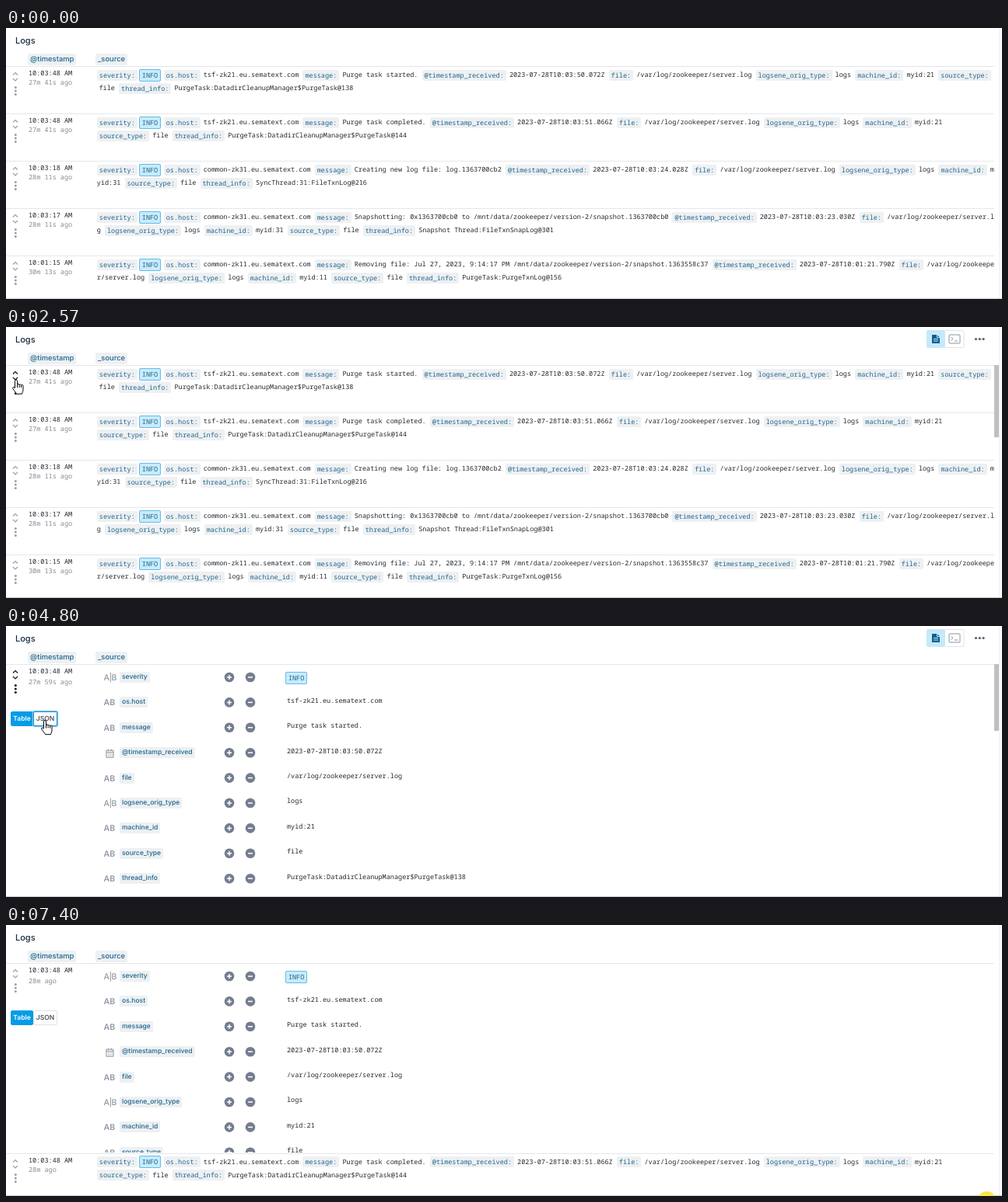
Recreate the animation shown at these times as an HTML page. Size 1280 by 349 pixels, loop 7460 ms.

```html
<!DOCTYPE html>
<html lang="en">
<head>
<meta charset="utf-8">
<title>Logs</title>
<style>
html, body { margin: 0; width: 100%; height: 100%; overflow: hidden; background: #fff; }
#stage { position: relative; width: 1280px; height: 349px; overflow: hidden; text-rendering: geometricPrecision; }
#stage div, #stage svg, p { position: absolute; margin: 0; box-sizing: border-box; }
#stage > svg, .layer { left: 0; top: 0; width: 1280px; height: 349px; overflow: hidden; }
p { font: 8.53px/16px "Noto Sans Mono", monospace; color: #24292f; white-space: pre; }
.ui { font-family: Inter, sans-serif; font-weight: 500; }
.title { font-size: 11px; color: #16293d; }
.head { font-size: 9.4px; }
.ago { color: #858a91; }
.type { font-size: 10.6px; font-weight: 600; color: #929aa6; }
.split { font-weight: 500; letter-spacing: -.6px; }
.val { font-size: 8.07px; color: #cc3a14; }
b { font-weight: inherit; color: #1c668f; background: #eef0f2; border-radius: 2px; padding: 1.5px 3px; margin-right: 4.1px; }
.ui b { padding: 2px 3px; }
i { font-style: normal; color: #1c668f; background: #c8ebfb; border: 1px solid #64bbe6; border-radius: 2px; padding: 1.5px 3px; margin: 0 -1.6px 0 -2.1px; }
.line { left: 0; width: 1270px; height: 1px; background: #e4e7ea; }
.icons { fill: #9ba0a7; stroke: #9ba0a7; width: 24px; height: 50px; left: 0; }
.icons.on { fill: #111; stroke: #111; }
.btn { top: 110px; height: 19px; font: 500 8.5px/18px Inter, sans-serif; text-align: center; color: #333c48; background: #fff; border: 1px solid #dfe3e8; border-radius: 2px; }
.btn.on { color: #fff; font-weight: 600; background: #049ce6; border-color: #049ce6; }
.btn.focus { border-color: #1c87c5; box-shadow: 0 0 0 1.2px #7fcbf3; }
#thumb { left: 1270px; top: 49px; width: 6px; background: #bfbfbf; }
#tip { right: 1241px; top: 51px; height: 16px; padding: 0 3.5px; background: #595959; font: 500 8.5px/16px Inter, sans-serif; color: #fff; white-space: pre; }
</style>
</head>
<body>
<div id="stage"></div>
<script>
const LOOP = 7460, PITCH = 5.12;
const stage = document.getElementById('stage');
const $ = id => document.getElementById(id);

const text = (x, y, s, cls = '') => `<p class="${cls}" style="left:${x}px;top:${y - 8}px">${s}</p>`;
const chip = (x, y, s, cls = '') => text(x, y, `<b>${s}</b>`, 'ui ' + cls);
const svg = (body, attrs = '') => `<svg ${attrs}>${body}</svg>`;
const rule = y => `<div class="line" style="top:${y}px"></div>`;
const layer = (id, body) => `<div class="layer" id="${id}">${body}</div>`;

// {label} becomes a chip, INFO a badge
const fields = s => s.replace(/\{(.*?)\} ?/g, '<b>$1</b>').replace('INFO', '<i>INFO</i>');

const SERVER = '{file:} /var/log/zookeeper/server.log {logsene_orig_type:} logs {machine_id:}';
const start = (host, msg, time) =>
  `{severity:} INFO {os.host:} ${host}.eu.sematext.com {message:} ${msg} {@timestamp_received:} 2023-07-28T${time}Z `;
const logs = [
  ['10:03:48', '27m 41s', start('tsf-zk21', 'Purge task started.', '10:03:50.072') + SERVER + ' myid:21 {source_type:}',
    'file {thread_info:} PurgeTask:DatadirCleanupManager$PurgeTask@138'],
  ['10:03:48', '27m 41s', start('tsf-zk21', 'Purge task completed.', '10:03:51.066') + SERVER + ' myid:21',
    '{source_type:} file {thread_info:} PurgeTask:DatadirCleanupManager$PurgeTask@144'],
  ['10:03:18', '28m 11s', start('common-zk31', 'Creating new log file: log.1363700cb2', '10:03:24.028') + SERVER + ' m',
    'yid:31 {source_type:} file {thread_info:} SyncThread:31:FileTxnLog@216'],
  ['10:03:17', '28m 11s', start('common-zk31', 'Snapshotting: 0x1363700cb0 to /mnt/data/zookeeper/version-2/snapshot.1363700cb0', '10:03:23.030') + '{file:} /var/log/zookeeper/server.l',
    'g {logsene_orig_type:} logs {machine_id:} myid:31 {source_type:} file {thread_info:} Snapshot Thread:FileTxnSnapLog@301'],
  ['10:01:15', '30m 13s', start('common-zk11', 'Removing file: Jul 27, 2023, 9:14:17 PM /mnt/data/zookeeper/version-2/snapshot.1363558c37', '10:01:21.790') + '{file:} /var/log/zookeepe',
    'r/server.log {logsene_orig_type:} logs {machine_id:} myid:11 {source_type:} file {thread_info:} PurgeTask:PurgeTxnLog@156']
];

const icons = top => svg(
  '<path d="M9 11.500l3-3 3 3M9 16l3 3 3-3" fill="none" stroke-width="1.2"/>' +
  [27.5, 32, 36.5].map(y => `<circle cx="12.300" cy="${y}" r="1.500" stroke="none"/>`).join(''),
  `class="icons" style="top:${top}px"`);
const source = ([, , a, b], top) =>
  text(116.8, top + 12, fields(a)) + text(b.startsWith('file') ? 119.5 : 116.8, top + 29, fields(b));
const row = (log, top, ago = log[1]) => rule(top) + icons(top) +
  text(29, top + 10, log[0] + ' AM') + text(29, top + 22, ago + ' ago', 'ago') + source(log, top);

const table = [
  ['A|B', 'severity', 'INFO'],
  ['AB', 'os.host', 'tsf-zk21.eu.sematext.com'],
  ['AB', 'message', 'Purge task started.'],
  ['', '@timestamp_received', '2023-07-28T10:03:50.072Z'],
  ['AB', 'file', '/var/log/zookeeper/server.log'],
  ['A|B', 'logsene_orig_type', 'logs'],
  ['AB', 'machine_id', 'myid:21'],
  ['AB', 'source_type', 'file'],
  ['AB', 'thread_info', 'PurgeTask:DatadirCleanupManager$PurgeTask@138']
].map(([type, name, value], i) => {
  const y = 66 + 32.4 * i;
  const round = (x, d) => `<circle cx="${x}" cy="${y}" r="6.300" fill="#747d8f"/><path d="M${x - 3} ${y}h6${d}" stroke="#fff" stroke-width="1.500"/>`;
  const calendar = type ? '' : `<g transform="translate(128.500 ${y - 4.5})" stroke="#858e9b" fill="none"><path d="M.5 1.500h9v9h-9zM.5 4h9M3 0v2M7 0v2"/><path d="M2.500 6h5.500M2.500 8.300h5.500" stroke-dasharray="1.200 1"/></g>`;
  return svg(round(287, 'm-3-3v6') + round(314, '') + calendar, 'class="layer"') +
    text(125.5, y + 1, type, 'ui type' + (type === 'A|B' ? ' split' : '')) + chip(146, y, name) +
    text(361, i ? y - 1.6 : y + 1, fields(value));
}).join('');

const pair = (x, y, key, value, cls = 'val') => {
  const end = x + PITCH * (key.length + 2);
  return text(x, y, `"${key}"`) + text(end + 2, y, ':') + text(end + 14, y, value, cls);
};
const json =
  svg('<path d="M126 56h6l-3 4zM147 144h6l-3 4z" fill="#333"/><path d="M129.500 66V277M150.500 154V173" stroke="#d5d8dc" stroke-dasharray="1 1"/>', 'class="layer"') +
  pair(137, 59, 'root', '{', '') + pair(158, 147, 'os', '{', '') +
  pair(166, 162, 'host', '"tsf-zk21.eu.sematext.com"') + text(147.5, 178, '}') + text(126.5, 282, '}') +
  [
    [75, '@timestamp', '2023-07-28T10:03:48.307Z'],
    [93, 'file', '/var/log/zookeeper/server.log'],
    [110.5, 'machine_id', 'myid:21'],
    [128, 'message', 'Purge task started.'],
    [195.5, 'severity', 'INFO'],
    [213, 'source_type', 'file'],
    [231, 'thread_info', 'PurgeTask:DatadirCleanupManager$PurgeTask@138'],
    [248.5, '@timestamp_received', '2023-07-28T10:03:50.072Z'],
    [266.5, 'logsene_orig_type', 'logs']
  ].map(([y, key, value]) => pair(145, y, key, `"${value}"`)).join('');

const toolbar = svg(
  '<rect x="1183" y="4" width="24" height="23" rx="2" fill="#c6e9f9"/>' +
  '<path d="M1207 4.500h22.500a1.500 1.500 0 0 1 1.500 1.500v19a1.500 1.500 0 0 1-1.500 1.500H1207" fill="#fff" stroke="#dfe3e8"/>' +
  '<path d="M1190 10h6.500l3.500 3.500v7.500h-10z" fill="#0d5f8f"/><path d="M1192 15.500h6M1192 18h6M1196.500 10v3.500h3.500" fill="none" stroke="#c6e9f9"/>' +
  '<rect x="1212" y="10" width="14" height="11" rx="1" fill="none" stroke="#8b94a1"/><path d="M1214.500 13l2.500 2.300-2.500 2.300M1219 18h4" fill="none" stroke="#8b94a1"/>' +
  [1246.5, 1251.3, 1256.1].map(x => `<circle cx="${x}" cy="15.500" r="1.600" fill="#565f6d"/>`).join(''), 'id="toolbar"');

const cursor = svg('<g id="cursor" fill="#fff" stroke="#000" stroke-linejoin="round">' +
  '<path id="arrow" d="M0 0V12.500l3-2.700 2 4.600 2-.9-2-4.500h4z"/>' +
  '<g id="hand"><path d="M-1.500 10V1a1.500 1.500 0 0 1 3 0v5a1.300 1.300 0 0 1 2.600.3 1.300 1.300 0 0 1 2.500.6 1.200 1.200 0 0 1 2.400.8v4c0 3-1 4-1.500 6h-7c-.7-2-3-4-4.600-6.700-1-1.700.6-2.500 1.600-1.500z"/>' +
  '<path d="M1.500 6v3.500M4.100 6.500v3M6.600 7v2.500" fill="none"/></g></g>' +
  '<circle id="spot" cx="1260.500" cy="355.200" r="12.200" fill="#fbe64d"/>');

stage.innerHTML =
  text(12, 15.5, 'Logs', 'ui title') + chip(28, 40.6, '@timestamp', 'head') + chip(115, 40.6, '_source', 'head') +
  rule(49) + icons(49) + text(29, 59, '10:03:48 AM') + '<p id="ago" class="ago" style="left:29px"></p>' +
  layer('list', source(logs[0], 49) + logs.slice(1).map((log, i) => row(log, 110 + 61 * i)).join('')) +
  layer('table', table) + layer('json', json) +
  layer('next', row(logs[1], 293.5, '28m')) +
  '<div id="buttons"><div class="btn" id="tableBtn" style="left:6px;width:29px">Table</div>' +
  '<div class="btn" id="jsonBtn" style="left:35px;width:31px">JSON</div></div>' +
  toolbar + '<div id="thumb"></div>' +
  '<div style="left:1276px;top:0;width:4px;height:349px;background:#fafbfc;border-left:1px solid #eff1f3"></div>' +
  '<div style="left:0;top:348px;width:1280px;height:1px;background:#c9cbcd"></div>' +
  '<div id="tip">Log context</div>' + cursor;

const rowIcons = [...document.querySelectorAll('.icons')];

// time, x, y of the pointer tip
const path = [
  [260, 1262, 352], [1000, 640, 110], [1070, 640, 110], [1560, 17, 73], [1710, 14, 69],
  [1970, 14, 69], [2040, 13, 68.5], [3830, 13, 68.5], [3900, 14, 71.5], [4380, 50, 122],
  [5260, 50, 122], [5860, 19, 118], [6530, 19, 118], [7000, 1262, 352]
];
const ease = u => u * u * (3 - 2 * u);
function pointer(t) {
  const i = path.findIndex(p => p[0] > t);
  if (i < 1) return null;
  const [t0, x0, y0] = path[i - 1], [t1, x1, y1] = path[i];
  const u = ease((t - t0) / (t1 - t0));
  return [x0 + (x1 - x0) * u, y0 + (y1 - y0) * u];
}

const show = (id, on) => $(id).style.display = on ? '' : 'none';
const within = (t, a, b) => t >= a && t < b;

function draw(t) {
  const list = t < 2640, json = within(t, 4870, 6000), compact = t >= 6000;
  show('list', list);
  show('table', !list && !json);
  show('json', json);
  show('next', compact);
  show('buttons', !list);
  $('table').style.height = (compact ? 293 : 349) + 'px';

  $('ago').textContent = (list ? '27m 41s' : t < 4200 ? '27m 57s' : compact ? '28m' : '27m 59s') + ' ago';
  $('ago').style.top = (list ? 63 : 65) + 'px';
  $('tableBtn').className = 'btn' + (!json || t >= 5930 ? ' on' : '') + (within(t, 5930, 7400) ? ' focus' : '');
  $('jsonBtn').className = 'btn' + (json ? ' on' : '') + (within(t, 4600, 5930) ? ' focus' : '');

  const active = within(t, 330, 6950);
  show('toolbar', active);
  show('thumb', active);
  $('thumb').style.height = (list ? 93 : compact ? 88 : 86) + 'px';
  show('tip', within(t, 1490, 1640));
  show('spot', t >= 7400);

  const p = pointer(t);
  let hover = -1;
  show('cursor', p);
  if (p) {
    const [x, y] = p;
    $('cursor').setAttribute('transform', `translate(${x} ${y})`);
    const hand = within(t, 2040, 3970) || within(t, 4310, 6560);
    show('hand', hand);
    show('arrow', !hand);
    if (y > 49) hover = list ? Math.floor((y - 49) / 61) : compact && y > 293 ? 5 : 0;
  }
  rowIcons.forEach((el, i) => el.classList.toggle('on', i === hover));
}

function tick(now) {
  draw(now % LOOP);
  requestAnimationFrame(tick);
}
draw(0);
requestAnimationFrame(tick);
</script>
</body>
</html>
```
